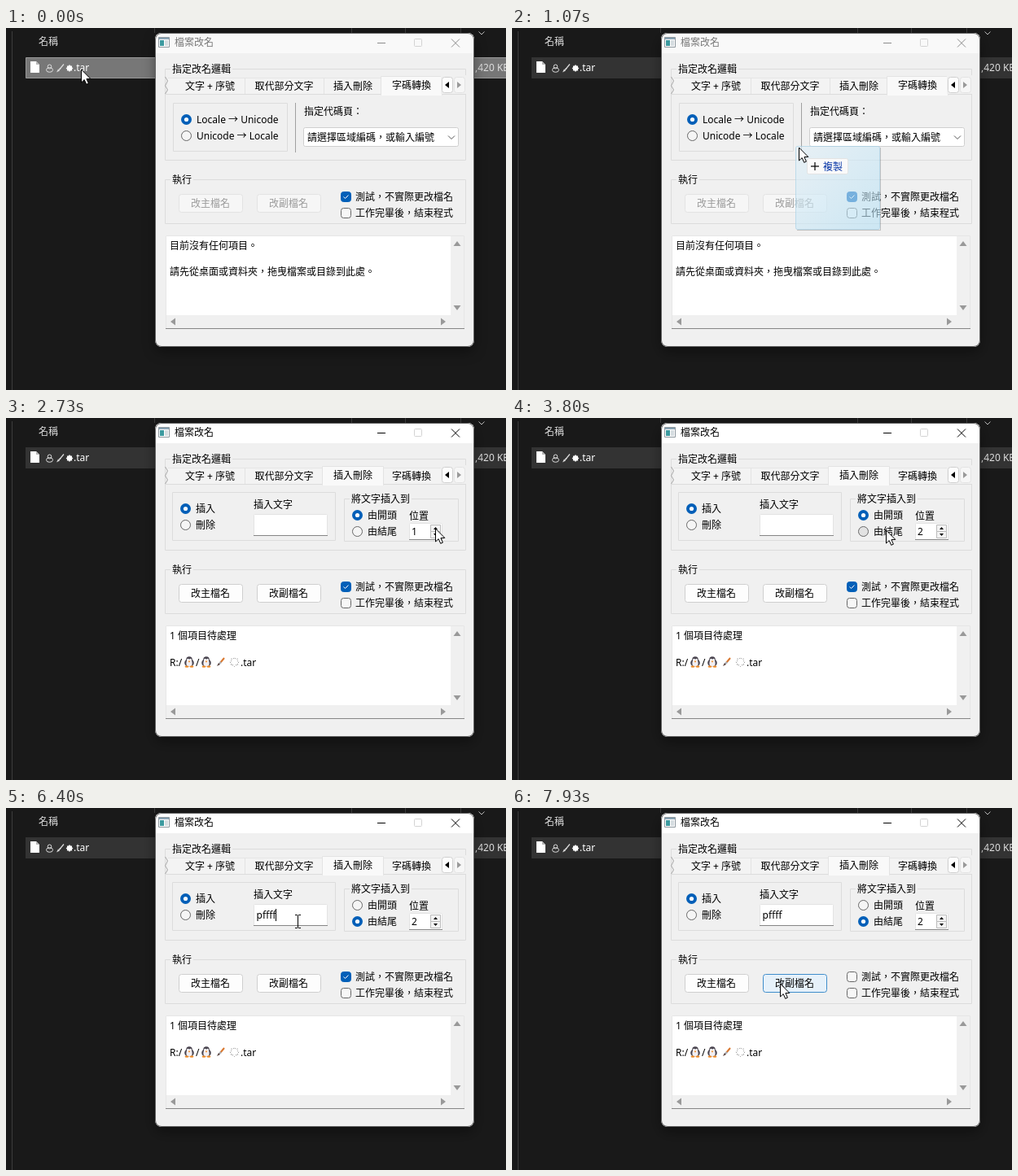
Recreate the animation shown at these times as an HTML page with a canvas. Size 614 by 445 pixels, loop 8000 ms.

```html
<!DOCTYPE html>
<html lang="zh-TW">
<head>
<meta charset="utf-8">
<title>檔案改名</title>
<style>
html, body { margin: 0; width: 100%; height: 100%; overflow: hidden; background: #191919; }
canvas { display: block; }
</style>
</head>
<body>
<canvas id="stage" width="614" height="445"></canvas>
<script>
const g = document.getElementById('stage').getContext('2d');
const LOOP = 8000, FPS = 15;
const BLUE = '#005fb8', FACE = '#f0f0f0', EDGE = '#dcdcdc', GREY = '#868686';

// Pointer stops: [time, x, y]
const POINTER = [
  [667, 93, 51], [1067, 353, 147], [1267, 354, 149], [1600, 434, 73], [1733, 434, 70],
  [1933, 434, 70], [2533, 525, 137], [2600, 525, 137], [2733, 528, 136], [2933, 528, 136],
  [3800, 460, 138], [4400, 356, 131], [6333, 356, 131], [7067, 377, 218], [7200, 398, 217],
  [7400, 416, 209], [7533, 416, 209], [7933, 330, 216]
];
const KEYS = [5530, 5800, 6000, 6200, 6400];

function pointerAt(t) {
  const i = POINTER.findIndex(p => p[0] > t);
  if (i === 0) return POINTER[0].slice(1);
  if (i < 0) return POINTER[POINTER.length - 1].slice(1);
  const [t0, x0, y0] = POINTER[i - 1], [t1, x1, y1] = POINTER[i];
  const k = (t - t0) / (t1 - t0);
  return [Math.round(x0 + (x1 - x0) * k), Math.round(y0 + (y1 - y0) * k)];
}

function rect(x, y, w, h, color) {
  g.fillStyle = color;
  g.fillRect(x, y, w, h);
}

function box(x, y, w, h, fill, stroke, radius = 0) {
  g.beginPath();
  g.roundRect(x + .5, y + .5, w - 1, h - 1, radius);
  if (fill) { g.fillStyle = fill; g.fill(); }
  if (stroke) { g.lineWidth = 1; g.strokeStyle = stroke; g.stroke(); }
}

function line(color, width, ...pts) {
  g.beginPath();
  for (let i = 0; i < pts.length; i += 2) g.lineTo(pts[i], pts[i + 1]);
  g.strokeStyle = color;
  g.lineWidth = width;
  g.stroke();
}

function shape(color, ...pts) {
  g.beginPath();
  for (let i = 0; i < pts.length; i += 2) g.lineTo(pts[i], pts[i + 1]);
  g.closePath();
  g.fillStyle = color;
  g.fill();
}

function oval(x, y, rx, ry, fill, stroke) {
  g.beginPath();
  g.ellipse(x, y, rx, ry, 0, 0, 7);
  if (fill) { g.fillStyle = fill; g.fill(); }
  if (stroke) { g.lineWidth = 1; g.strokeStyle = stroke; g.stroke(); }
}

// y is the optical middle of the line
function text(s, x, y, color = '#000', align = 'left') {
  g.font = '12px "Noto Sans", "Noto Sans CJK TC", "Noto Sans CJK", sans-serif';
  g.textAlign = align;
  g.fillStyle = color;
  g.fillText(s, x, y + 5);
}

function group(x, y, w, h, label) {
  box(x, y, w, h, null, EDGE);
  if (!label) return;
  rect(x + 7, y - 1, label.length * 12 + 4, 3, FACE);
  text(label, x + 9, y);
}

function radio(x, y, on, label, hover) {
  if (on) {
    oval(x, y, 6.5, 6.5, BLUE);
    oval(x, y, 2.6, 2.6, '#fff');
  } else oval(x, y, 6, 6, hover ? '#e2e2e2' : '#f5f5f5', '#666');
  text(label, x + 12.5, y - .5);
}

function checkbox(x, y, on, label) {
  box(x, y, 13, 13, on ? BLUE : '#f7f7f7', on ? BLUE : '#666', 3);
  if (on) line('#fff', 1, x + 3.5, y + 6.5, x + 5.5, y + 8.5, x + 9.5, y + 4.5);
  text(label, x + 18, y + 6);
}

function button(x, label, enabled, hover) {
  box(x, 204, 79, 23, hover ? '#e6f1fa' : enabled ? '#fdfdfd' : '#f6f6f6',
    hover ? '#3f8dcb' : enabled ? '#cfcfcf' : '#e3e3e3', 3);
  text(label, x + 39, 215, enabled ? '#000' : '#9a9a9a', 'center');
}

function field(x, y, w, h, focus) {
  box(x, y, w, h, '#fff', '#e3e3e3', 1);
  if (focus) rect(x, y + h - 2, w, 2, BLUE);
  else rect(x, y + h - 1, w, 1, GREY);
}

function penguin(x, y, mono) {
  if (mono) {
    oval(x, y + 2, 4, 2.8, null, '#ddd');
    oval(x, y - 2, 2.3, 2.5, null, '#ddd');
    return;
  }
  oval(x, y + 1, 5.8, 5, '#4a4550');
  oval(x, y - 2.5, 3.8, 4.2, '#4a4550');
  oval(x, y + 1.5, 3.6, 4.4, '#f2eff3');
  oval(x - 1.5, y - 2.5, 1.4, 1.7, '#fff');
  oval(x + 1.5, y - 2.5, 1.4, 1.7, '#fff');
  shape('#f08a24', x - 1.5, y - 1.5, x + 1.5, y - 1.5, x, y + .8);
  oval(x - 3, y + 5.6, 2.4, 1.2, '#f08a24');
  oval(x + 3, y + 5.6, 2.4, 1.2, '#f08a24');
}

function brush(x, y, mono) {
  line(mono ? '#ddd' : '#d9772f', mono ? 1.2 : 2, x + 4, y - 5, x - 1, y + 1);
  line(mono ? '#ddd' : '#aab0b8', mono ? 1.6 : 2.4, x, y, x - 2, y + 2);
  shape(mono ? '#ddd' : '#5a4440', x - 1, y + 3, x - 3, y + 1, x - 5, y + 5);
}

function burst(x, y, mono) {
  const r = mono ? 4.4 : 5.6;
  g.beginPath();
  for (let i = 0; i < 16; i++) {
    const a = i * Math.PI / 8, d = i % 2 ? r * .72 : r;
    g.lineTo(x + d * Math.cos(a), y + d * Math.sin(a));
  }
  g.closePath();
  g.fillStyle = '#fff';
  g.fill();
  if (!mono) {
    g.setLineDash([1.5, 1.5]);
    g.strokeStyle = '#999';
    g.lineWidth = 1;
    g.stroke();
    g.setLineDash([]);
  }
}

function explorer(selected) {
  rect(0, 0, 614, 445, '#191919');
  rect(7, 4, 1, 441, '#3c3c3c');
  for (const x of [182, 424, 490, 558]) rect(x, 0, 1, 6, '#3c3c3c');
  line('#bbb', 1, 580.5, 4.5, 584, 8, 587.5, 4.5);
  text('名稱', 40, 16, '#dedede');
  if (selected) box(24, 36, 591, 26, '#777', '#999');
  else rect(24, 36, 590, 26, '#333');
  shape('#fff', 30, 41, 37, 41, 41, 45, 41, 55, 30, 55);
  shape('#b5b5b5', 37, 41, 41, 45, 37, 45);
  penguin(53.5, 49.5, true);
  brush(67, 49.5, true);
  burst(78, 49.5, true);
  text('.tar', 83, 48, '#fff');
  text(',420 KB', 576, 48, '#dedede');
}

function frame(active) {
  g.save();
  g.shadowColor = 'rgba(0,0,0,.4)';
  g.shadowBlur = 16;
  g.shadowOffsetY = 6;
  box(183, 6, 392, 386, FACE, null, 8);
  g.restore();
  g.save();
  g.beginPath();
  g.roundRect(183, 6, 392, 386, 8);
  g.clip();
  rect(183, 6, 392, 386, FACE);
  rect(183, 6, 392, 25, active ? '#fff' : '#f9f9f9');
  g.restore();
  box(183, 6, 392, 386, null, '#666', 7.5);
  const ink = active ? '#000' : '#8c8c8c';
  box(187, 11, 14, 13, '#fff', '#8d979e');
  rect(188, 12, 12, 2, '#8ba5b5');
  rect(189, 15, 5, 7, '#3c9aa0');
  rect(195, 15, 4, 7, '#d5dce0');
  text('檔案改名', 207, 17, active ? '#000' : '#777');
  rect(456, 18, 10, 1, ink);
  box(501, 13, 10, 10, null, '#d3d3d3', 1);
  line(ink, 1, 547, 13.5, 557, 23.5);
  line(ink, 1, 557, 13.5, 547, 23.5);
}

function tabs(current) {
  group(195, 50, 370, 113, '指定改名邏輯');
  rect(195, 81, 369, 1, EDGE);
  const labels = [['文字 + 序號', 208, 293], ['取代部分文字', 293, 390], ['插入刪除', 390, 462], ['字碼轉換', 462, 534]];
  rect(199, 61, 335, 20, '#f3f3f3');
  rect(199, 61, 335, 1, '#e5e5e5');
  line('#a8a8a8', 1, 195.5, 60, 198.5, 65, 195.5, 71, 198.5, 76, 195.5, 81);
  labels.forEach(([, , right]) => rect(right, 61, 1, 20, '#e3e3e3'));
  labels.forEach(([label, left, right], i) => {
    if (i === current) {
      box(left - 2, 59, right - left + 4, 24, '#f9f9f9', '#e3e3e3');
      rect(left - 1, 81, right - left + 2, 2, '#f9f9f9');
    }
    text(label, (left + right) / 2, i === current ? 70 : 71, '#000', 'center');
  });
  rect(534, 58, 31, 23, FACE);
  box(535, 60, 14, 20, '#fdfdfd', '#cfcfcf', 3);
  box(550, 60, 14, 20, '#f6f6f6', '#e3e3e3', 3);
  shape('#000', 544, 66, 544, 74, 539, 70);
  shape('#999', 554, 66, 554, 74, 559, 70);
}

function convertPage() {
  group(205, 92, 141, 60);
  radio(221.5, 112.5, true, 'Locale → Unicode');
  radio(221.5, 132.5, false, 'Unicode → Locale');
  rect(355, 92, 1, 61, '#a0a0a0');
  text('指定代碼頁：', 366, 102);
  box(365, 122, 191, 24, '#fff', '#cfcfcf', 2);
  text('請選擇區域編碼，或輸入編號', 370, 134);
  line('#555', 1, 543, 132.5, 547, 136.5, 551, 132.5);
}

function insertPage(t, hoverEnd) {
  group(204, 91, 201, 60);
  radio(220.5, 111.5, true, '插入');
  radio(220.5, 131.5, false, '刪除');
  text('插入文字', 304, 106);
  field(304, 118, 91, 27, t >= 6460 && t < 7400);
  const typed = 'pffff'.slice(0, KEYS.filter(k => t >= k).length);
  text(typed, 307.5, 131);
  const since = t - Math.max(4600, ...KEYS.filter(k => t >= k));
  if (since >= 0 && t < 7400 && since % 1060 < 525)
    rect(Math.round(307 + g.measureText(typed).width), 124, 1, 15, '#000');

  group(415, 99, 141, 53, '將文字插入到');
  const fromEnd = t >= 3860;
  radio(431.5, 119.5, !fromEnd, '由開頭');
  radio(431.5, 139.5, fromEnd, '由結尾', hoverEnd);
  text('位置', 495, 120);
  field(495, 129, 41, 21);
  text(t < 2990 ? '1' : '2', 498, 139);
  box(521, 131, 13, 9, '#f3f3f3', '#bbb');
  box(521, 139, 13, 9, '#f3f3f3', '#bbb');
  shape('#000', 525, 137, 530, 137, 527.5, 134);
  shape('#000', 525, 142, 530, 142, 527.5, 145);
}

function output(loaded) {
  rect(196, 255, 367, 115, FACE);
  rect(196, 255, 350, 98, '#fff');
  box(196, 255, 367, 115, null, '#e6e6e6');
  rect(196, 369, 367, 1, GREY);
  shape('#999', 549.5, 268, 558.5, 268, 554, 262);
  shape('#999', 549.5, 341, 558.5, 341, 554, 347);
  shape('#999', 208, 356.5, 208, 365.5, 202, 361);
  shape('#999', 534, 356.5, 534, 365.5, 540, 361);
  if (!loaded) {
    text('目前沒有任何項目。', 201, 267);
    text('請先從桌面或資料夾，拖曳檔案或目錄到此處。', 201, 299);
    return;
  }
  text('1 個項目待處理', 201, 267);
  text('R:/', 201, 300);
  penguin(225, 300);
  text('/', 233, 300);
  penguin(246, 300);
  brush(264, 300);
  burst(280.5, 300);
  text('.tar', 288, 300);
}

function dragGhost(x, y) {
  const left = x - 5, top = y - 2;
  const fill = g.createLinearGradient(left, top, left + 104, top + 103);
  fill.addColorStop(0, 'rgba(226,240,248,.6)');
  fill.addColorStop(1, 'rgba(180,224,245,.6)');
  rect(left + 2, top + 103, 103, 1, 'rgba(0,0,0,.2)');
  rect(left + 104, top + 2, 1, 101, 'rgba(0,0,0,.2)');
  box(left, top, 104, 103, fill, 'rgba(160,205,228,.6)', 2);
  if (x < 183) return;
  box(x + 9, y + 13, 51, 20, '#fafafa', '#e3e3e3', 2);
  line('#000', 1.2, x + 14, y + 23, x + 24, y + 23);
  line('#000', 1.2, x + 19, y + 18, x + 19, y + 28);
  text('複製', x + 29, y + 23, '#0a38a8');
}

function arrow(x, y) {
  g.beginPath();
  for (const [dx, dy] of [[0, 0], [0, 16], [3.7, 12.6], [6.2, 18.3], [8.9, 17.1], [6.4, 11.6], [11.3, 11.4]])
    g.lineTo(x - .5 + dx, y + dy);
  g.closePath();
  g.fillStyle = '#fff';
  g.fill();
  g.strokeStyle = '#000';
  g.lineWidth = 1;
  g.stroke();
}

function ibeam(x, y) {
  rect(x, y - 7, 1, 15, '#000');
  for (const dy of [-8, 8]) {
    rect(x - 3, y + dy, 3, 1, '#000');
    rect(x + 1, y + dy, 3, 1, '#000');
  }
}

function draw(t) {
  const [x, y] = pointerAt(t);
  const inside = (l, top, r, b) => x >= l && x < r && y >= top && y < b;
  const loaded = t >= 1590, insert = t >= 1720;
  explorer(t < 720);
  frame(loaded);
  tabs(insert ? 2 : 3);
  if (insert) insertPage(t, inside(425, 132, 481, 147));
  else convertPage();
  group(195, 186, 370, 55, '執行');
  button(212, '改主檔名', loaded, loaded && inside(212, 204, 291, 227));
  button(308, '改副檔名', loaded, loaded && inside(308, 204, 387, 227));
  checkbox(411, 201, t < 7460, '測試，不實際更改檔名');
  checkbox(411, 221, false, '工作完畢後，結束程式');
  output(loaded);
  if (t >= 720 && t < 1260) dragGhost(x, y);
  if (insert && inside(304, 118, 395, 145)) ibeam(x, y);
  else arrow(x, y);
}

function tick(now) {
  const t = now % LOOP;
  draw(Math.floor((t + 5) * FPS / 1000) * 1000 / FPS);
  requestAnimationFrame(tick);
}
requestAnimationFrame(tick);
</script>
</body>
</html>
```
